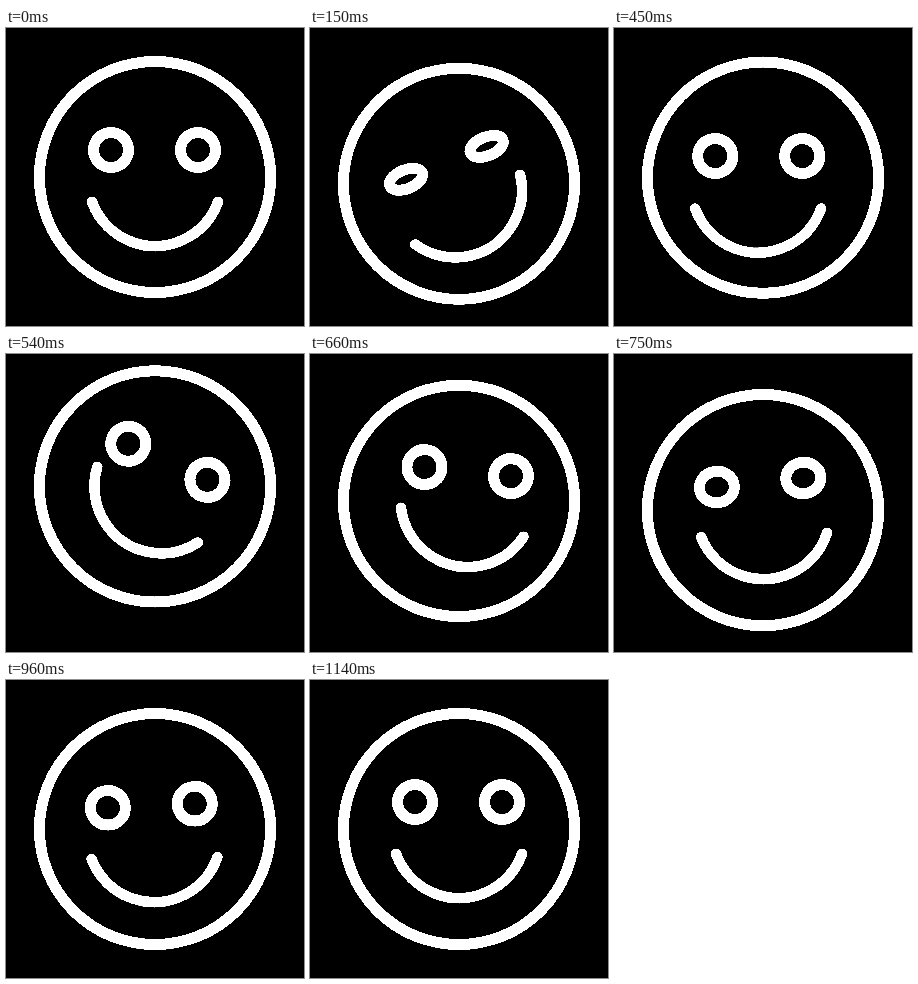
Animation, 298 px wide and 298 px high, one loop 1500 ms. Source, as an HTML page with a canvas:

```html
<!DOCTYPE html>
<html lang="en">
<head>
<meta charset="utf-8">
<title>Smiley</title>
<style>
  html, body { margin: 0; width: 100%; height: 100%; overflow: hidden; background: #000; }
  canvas { display: block; width: 298px; height: 298px; filter: contrast(20); }
</style>
</head>
<body>
<canvas id="stage" width="298" height="298"></canvas>
<script>
const ctx = document.getElementById('stage').getContext('2d');
const LOOP = 1500, STEP = 30, SIZE = 298, CENTER = 149;
const radians = degrees => degrees * Math.PI / 180;

const smooth = s => s * s * (3 - 2 * s);
const clamp = s => Math.min(1, Math.max(0, s));

// Eased progress from 0 to 1 between two times in ms.
const leg = (t, from, to) => smooth(clamp((t - from) / (to - from)));

// Each motion winds up, swings over, rebounds and settles at zero.
const bounce = t =>
  leg(t, 0, 360) - 1.92 * leg(t, 360, 540) + 1.32 * leg(t, 540, 750) - 0.4 * leg(t, 750, 960);

const sink = t =>
  leg(t, 0, 360) - 1.58 * leg(t, 360, 540) + 0.84 * leg(t, 540, 780) - 0.26 * leg(t, 780, 1140);

const drift = (t, left, right, back) =>
  -left * leg(t, 0, 240) + (left + right) * leg(t, 405, 600)
  - (right + back) * leg(t, 600, 800) + back * leg(t, 800, 1110);

const tilt = (t, angle, back) =>
  -angle * leg(t, 0, 185) + 2 * angle * leg(t, 360, 540)
  - (angle + back) * leg(t, 540, 750) + back * leg(t, 750, 1140);

const blink = (t, middle) => smooth(clamp(1 - Math.abs(t - middle) / 130));

function strokeEllipse(x, y, rx, ry, from = 0, to = Math.PI * 2) {
  ctx.beginPath();
  ctx.ellipse(x, y, rx, ry, 0, from, to);
  ctx.stroke();
}

function withPose(x, y, degrees, draw) {
  ctx.save();
  ctx.translate(CENTER + x, CENTER + y);
  ctx.rotate(radians(degrees));
  draw();
  ctx.restore();
}

function drawFace(t) {
  ctx.fillStyle = '#000';
  ctx.fillRect(0, 0, SIZE, SIZE);
  ctx.strokeStyle = '#fff';
  ctx.lineCap = 'round';

  ctx.lineWidth = 11;
  strokeEllipse(CENTER, CENTER + 18 * bounce(t), 115.6, 115.6);

  withPose(drift(t - 30, 4, 7, 3.2), 28.3 * sink(t), tilt(t, 24.5, 6), () => {
    const open = 17.5 - 8 * (blink(t, 150) + blink(t, 840));
    for (const side of [-1, 1]) strokeEllipse(43.5 * side - 0.5, -27, 17.5, open);
  });

  ctx.lineWidth = 10.5;
  withPose(drift(t, 7.5, 12, 2), 31.5 * sink(t), tilt(t, 37, 2), () => {
    strokeEllipse(0, 2, 67, 67, radians(20), radians(160));
  });
}

const start = performance.now();
function tick() {
  const t = (performance.now() - start) % LOOP;
  drawFace(Math.floor(t / STEP) * STEP);
  requestAnimationFrame(tick);
}
tick();
</script>
</body>
</html>
```
